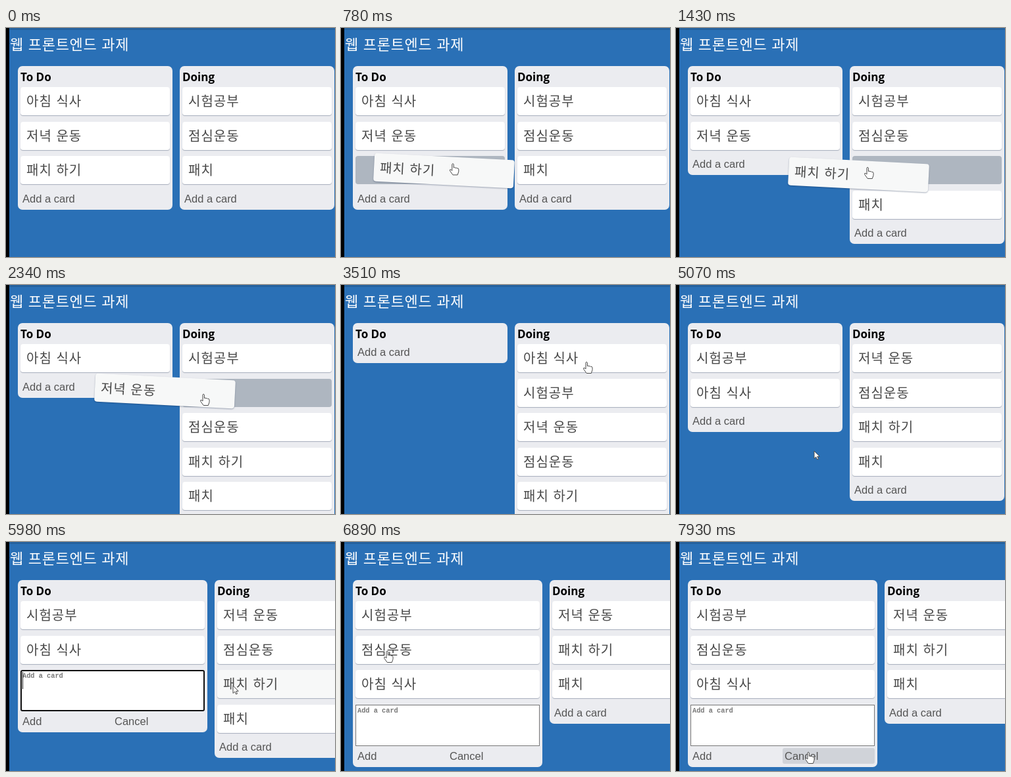
Animation, 500 px wide and 349 px high, one loop 8000 ms. Source, as an HTML page:

```html
<!DOCTYPE html>
<html lang="ko">
<head>
<meta charset="utf-8">
<style>
html, body { margin: 0; width: 100%; height: 100%; overflow: hidden; background: #2a70b6; }
#stage { position: relative; width: 500px; height: 349px; overflow: hidden; background: #2a70b6; }
#stage * { position: absolute; box-sizing: border-box; white-space: pre; }
.top { left: 0; top: 0; width: 500px; height: 3px; background: #25619d; }
.edge { left: 0; top: 0; width: 5px; height: 349px; background: #000; }
.title { left: 6px; top: 0; line-height: 47px; color: #fff; letter-spacing: .7px; font: 22px/47px "Noto Sans CJK KR", "Noto Sans CJK", sans-serif; }
.column { top: 58px; background: #ebecf0; border-radius: 7px; }
.column b { left: 4px; top: 5px; color: #000; font: bold 17px/24px "Open Sans", sans-serif; }
.button { color: #555; height: 24px; padding-left: 3px; border-radius: 3px; font: 16.5px/24px "Liberation Sans", Arial, sans-serif; }
.card, .slot { height: 43px; border-radius: 4px; }
.card { padding-left: 9px; background: #fff; color: #484848; box-shadow: 0 1px 1px rgba(9, 30, 66, .3); letter-spacing: 1px; font: 20px/41px "Noto Sans CJK KR", "Noto Sans CJK", sans-serif; }
.hover { background: #f7f8f8; }
.drag { background: #f7f8f8; z-index: 2; box-shadow: 0 1px 2px rgba(9, 30, 66, .35); }
.slot { background: #aeb6c0; }
.editor { height: 63px; left: 22px; width: 280px; background: #fff; border: 1px solid #767676; color: #777; padding-left: 2px; font: bold 10.3px/17px "Liberation Mono", monospace; }
.focus { border: 2px solid #101010; border-radius: 3px; padding-left: 1px; line-height: 15px; }
.caret { left: 25px; width: 1px; height: 26px; background: #222; }
svg { z-index: 3; left: 0; top: 0; overflow: visible; }
</style>
</head>
<body>
<div id="stage">
  <div class="top"></div>
  <div class="edge"></div>
  <div class="title">웹 프론트엔드 과제</div>
</div>
<script>
const LOOP = 8000, TICK = 130, PITCH = 52.6, FIRST = 90;
const stage = document.getElementById("stage");

const names = { a: "아침 식사", e: "저녁 운동", h: "패치 하기", s: "시험공부", l: "점심운동", p: "패치" };

// time, left list, right list ("_" is the drop slot), dragged card, its centre relative to the pointer
const steps = [
  [0, "aeh", "slp"],
  [650, "ae_", "slp", "h", -13, 11.5],
  [1040, "ae", "sl_p", "h", -13, 11.5],
  [1690, "ae", "slhp"],
  [1950, "a_", "slhp", "e", -58, -4.5],
  [2210, "a", "s_lhp", "e", -58, -4.5],
  [2600, "a", "selhp"],
  [2860, "_", "selhp", "a", -60, -4],
  [3120, "", "_selhp", "a", -60, -4],
  [3380, "", "aselhp"],
  [3770, "", "_selhp", "a", 1, -6],
  [4030, "_", "selhp", "a", 1, -6],
  [4160, "a", "selhp"],
  [4420, "a", "_elhp", "s", 14, -4],
  [4680, "_a", "elhp", "s", 14, -4],
  [4810, "sa", "elhp"],
  [6370, "sa", "e_hp", "l", 108, -4],
  [6630, "s_a", "ehp", "l", 108, -4],
  [6890, "sla", "ehp"]
];

// time, x, y of the pointer tip
const path = [
  [0, 141, 400], [130, 141, 380], [520, 141, 205], [650, 141, 205], [1300, 285, 212], [1430, 291, 212],
  [1690, 300, 205], [1950, 186, 168], [2340, 300, 166], [2600, 310, 158],
  [2860, 188, 115], [3250, 360, 116], [3380, 373, 117], [3770, 373, 117],
  [4160, 130, 115], [4420, 360, 115], [4810, 120, 112], [5070, 210, 253],
  [5330, 70, 205], [5460, 70, 205], [5720, 345, 219], [5980, 345, 219],
  [6240, 352, 168], [6370, 352, 168], [6760, 80, 166], [6890, 70, 166],
  [7540, 201, 320], [8000, 201, 320]
];

// spans during which the pointer is an arrow
const arrows = [[4940, 5200], [5590, 6110]];
const OPEN = 5460, BLUR = 6370, CANCEL = 7540;

function add(cls, text = "", parent = stage, tag = "div") {
  const el = document.createElement(tag);
  el.className = cls;
  el.textContent = text;
  return parent.appendChild(el);
}

function place(el, x, y, w) {
  el.style.left = x + "px";
  el.style.top = y + "px";
  if (w) el.style.width = w + "px";
}

function show(el, on) {
  el.style.display = on ? "" : "none";
}

const columns = ["To Do", "Doing"].map(name => {
  const el = add("column");
  add("", name, el, "b");
  return el;
});
const adders = columns.map(() => add("button", "Add a card"));
const slot = add("slot");
const editor = add("editor", "Add a card");
const caret = add("caret");
const save = add("button", "Add");
const cancel = add("button", "Cancel");
const cards = {};
for (const key in names) cards[key] = add("card", names[key]);

stage.insertAdjacentHTML("beforeend", `<svg width="20" height="20" stroke="#4a4a4a" stroke-linejoin="round">
  <path id="hand" fill="#fff" d="M-1 9V1.2Q0-.8 1.4 1.2V6.5Q3.2 5.2 4 7Q5.8 5.8 6.5 7.6Q8.6 6.6 9 8.8V12.5L7.3 17.5H.2L-4.2 11.3Q-5 8.6-2.6 9.5L-1 11Z"/>
  <path id="arrow" fill="#fff" d="M0 0V11.5L2.7 9L4.6 13L6.5 12.2L4.7 8.3H8.2Z"/></svg>`);
const pointer = stage.querySelector("svg");
const hand = document.getElementById("hand");
const arrow = document.getElementById("arrow");

function pointAt(t) {
  const i = Math.max(1, path.findIndex(p => p[0] >= t));
  const [t0, x0, y0] = path[i - 1], [t1, x1, y1] = path[i];
  const k = (t - t0) / (t1 - t0);
  return [x0 + (x1 - x0) * k, y0 + (y1 - y0) * k];
}

function render(t) {
  const [, left, right, dragged, dx, dy] = steps.filter(s => s[0] <= t).pop();
  const open = t >= OPEN;
  const width = open ? 288 : 235;
  const cardWidth = width - 8;
  const [px, py] = pointAt(t);

  show(slot, dragged);
  [left, right].forEach((list, c) => {
    const x = 18 + c * (width + 11);
    const end = FIRST + list.length * PITCH;
    const editing = open && c === 0;
    place(columns[c], x, 58, width);
    columns[c].style.height = end - 29 + (editing ? 66 : 0) + "px";
    place(adders[c], x + 4, end, cardWidth);
    show(adders[c], !editing);
    [...list].forEach((key, i) => {
      const el = key === "_" ? slot : cards[key];
      place(el, x + 4, FIRST + i * PITCH, cardWidth);
      el.style.transform = "";
    });
    if (c === 0) {
      place(editor, 22, end);
      place(caret, 25, end + 3);
      place(save, 22, end + 66, 140);
      place(cancel, 162, end + 66, 140);
    }
  });

  const focused = open && t < BLUR;
  [editor, save, cancel].forEach(el => show(el, open));
  show(caret, focused);
  editor.classList.toggle("focus", focused);
  cancel.style.background = t >= CANCEL ? "#d0d3d9" : "";

  for (const key in cards) {
    cards[key].classList.toggle("drag", key === dragged);
    cards[key].classList.toggle("hover", key === "h" && t >= 5720 && t < 6240);
  }
  if (dragged) {
    const w = cardWidth * .94;
    place(cards[dragged], px + dx - w / 2, py + dy - 21.5, w);
    cards[dragged].style.transform = "rotate(2.9deg)";
  }

  const isArrow = arrows.some(([a, b]) => t >= a && t <= b);
  show(arrow, isArrow);
  show(hand, !isArrow);
  pointer.style.transform = `translate(${px}px, ${py}px)`;
}

function frame(now) {
  render(Math.floor(now % LOOP / TICK) * TICK);
  requestAnimationFrame(frame);
}
render(0);
requestAnimationFrame(frame);
</script>
</body>
</html>
```
